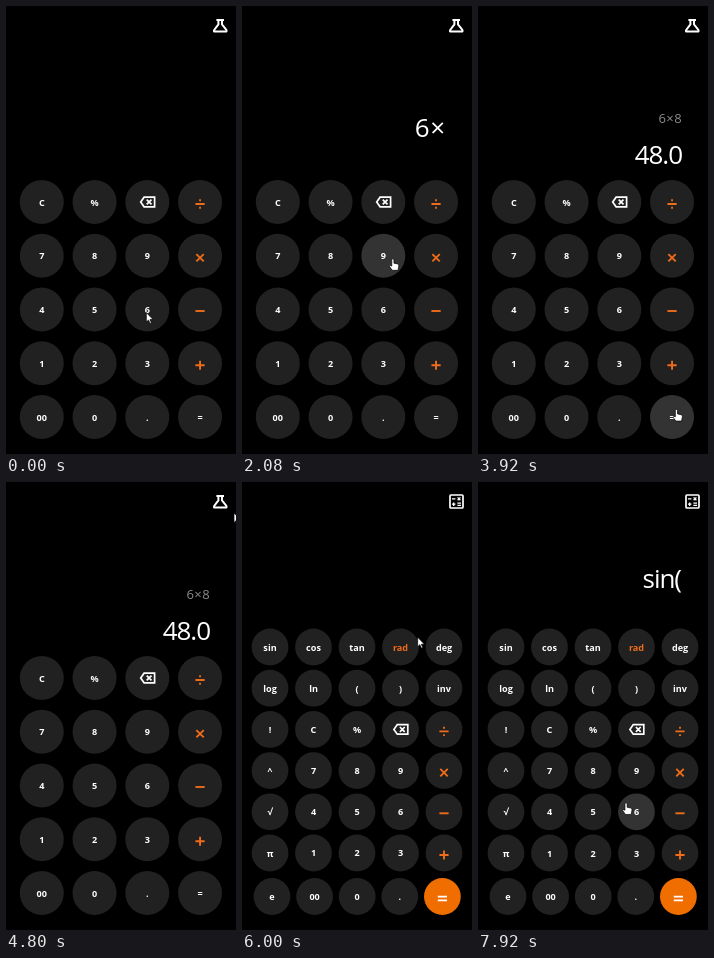
Recreate the animation shown at these times as an HTML page. Size 230 by 448 pixels, loop 8000 ms.

```html
<!DOCTYPE html>
<html lang="en">
<head>
<meta charset="utf-8">
<title>Calculator</title>
<style>
html, body { margin: 0; width: 100%; height: 100%; overflow: hidden; background: #000; }
svg { display: block; width: 100vw; height: 100vh; font-family: "Open Sans", "Noto Sans", sans-serif; }
.key text { font-size: 9.1px; font-weight: 700; fill: #fff; text-anchor: middle; }
.line { fill: none; stroke: #fff; stroke-width: 1.7; }
.accent { stroke: #ef6c1a; stroke-width: 1.9; }
#display text { text-anchor: end; fill: #fff; }
#cursor path { fill: #fff; stroke: #000; stroke-width: .7; }
</style>
</head>
<body>
<svg id="stage" viewBox="0 0 230 448">
  <rect width="230" height="448"/>
  <g id="flask">
    <circle id="glow" cx="213" cy="13" r="22" fill="#2a2a2a"/>
    <path class="line" style="stroke-width:2" d="M210.4 14H218M212.4 14V18.4L208.2 24Q207.4 25.6 209 25.6H219.6Q221 25.6 220.4 24L216 18.4V14"/>
  </g>
  <g id="pad" class="line">
    <rect x="208" y="13" width="13" height="13" rx="1"/>
    <path stroke-width="1.3" d="M210 16.8H213.4M215.6 15.4l2.8 2.8m0-2.8l-2.8 2.8M210 22.2h3.4m-1.7-1.7v3.4M215.4 21.2h3.6M215.4 23.4h3.6"/>
  </g>
  <g id="display"><text id="small"></text><text id="main"></text></g>
  <g id="keys"></g>
  <g id="cursor">
    <path id="arrow" d="M0 0V9.6L2.2 7.6L3.8 11L5.2 10.4L3.7 7.1H6.8Z"/>
    <path id="hand" d="M-1.1 1Q-1.1 0 0 0T1.1 1V4.4L4.8 5.2Q6 5.6 6 7L5.2 11.6H-.6L-3.4 7.6Q-3.2 6.2 -1.1 7.3Z"/>
  </g>
</svg>
<script>
const LOOP = 8000, TICK = 80, SWITCH = 5440;
const $ = id => document.getElementById(id);
const lerp = (a, b, p) => a + (b - a) * p;
const mix = (a, b, p) => a.map((v, i) => lerp(v, b[i], p));
const clamp = v => Math.max(0, Math.min(1, v));
const show = (el, on) => el.setAttribute('visibility', on ? 'visible' : 'hidden');

function set(el, attrs) {
  for (const k in attrs) el.setAttribute(k, attrs[k]);
}
function add(parent, tag, attrs, text = '') {
  const el = document.createElementNS('http://www.w3.org/2000/svg', tag);
  set(el, attrs);
  el.textContent = text;
  return parent.appendChild(el);
}

const glyphs = {
  '÷': 'M-4.6 2H4.6M-.9 -1.7H.9M-.9 5.7H.9',
  '×': 'M-3.7 -1.7L3.7 5.7M3.7 -1.7L-3.7 5.7',
  '−': 'M-4.6 1.5H4.6',
  '+': 'M-4.6 2H4.6M0 -2.6V6.6',
  '⌫': 'M-6.6 0L-3.2 -4.8H7.3V4.8H-3.2ZM-.6 -2.4L4.2 2.4M4.2 -2.4L-.6 2.4'
};
const rows = [
  'sin cos tan rad deg', 'log ln ( ) inv', '! C % ⌫ ÷', '^ 7 8 9 ×',
  '√ 4 5 6 −', 'π 1 2 3 +', 'e 00 0 . ='
];
const keys = {};
rows.forEach((row, r) => row.split(' ').forEach((label, c) => {
  const g = add($('keys'), 'g', { class: 'key' });
  const last = r == rows.length - 1;
  const key = keys[label] = {
    g, row: r - 2, col: c,
    wide: last ? [30 + 42.6 * c, 414.5] : [28 + 43.5 * c, 165 + 41.2 * r],
    basic: r > 1 && c > 0 ? [35.8 + (c - 1) * 52.75, 196 + (r - 2) * 53.75] : null,
    disc: add(g, 'circle', {})
  };
  if (glyphs[label]) add(g, 'path', { d: glyphs[label], class: label == '⌫' ? 'line' : 'line accent' });
  else key.text = add(g, 'text', { y: 3.5, style: label == 'rad' ? 'fill:#ef6c1a' : '' }, label);
  if (label == '=') key.big = add(g, 'path', { d: 'M-4.6 .2H4.6M-4.6 3.8H4.6', class: 'line' });
}));

function place(key, t) {
  if (t < SWITCH || !key.basic) return t < SWITCH ? key.basic : key.wide;
  const left = Math.exp((SWITCH - t) / 70);
  return [
    lerp(key.wide[0], key.basic[0], (.03 + .035 * key.row) * left),
    lerp(key.wide[1], key.basic[1], (.28 - .025 * key.col) * left)
  ];
}
const radius = t => t < SWITCH ? 22 : 18.4;

// pointer stops: arrival, departure, key or point
const stops = [
  [0, 1200, '6'], [1680, 1760, '×'], [2560, 2800, '8'], [3120, 3120, '+'], [3440, 3840, '='],
  [4480, 4640, [236, 330]], [4800, 4800, [228, 31]], [5120, 5600, [221, 20]],
  [6160, 6160, ')'], [6720, 6720, 'cos'], [7040, 7280, 'sin'], [7970, LOOP, '6']
];
function spot([time, , where]) {
  if (!keys[where]) return where;
  const [x, y] = time < SWITCH ? keys[where].basic : keys[where].wide;
  return [x - 1, y + 3];
}
function tipAt(t) {
  const i = stops.findIndex(s => t <= s[1]), next = stops[i], prev = stops[i - 1] || next;
  const p = clamp((t - prev[1]) / (next[0] - prev[1] || 1));
  return mix(spot(prev), spot(next), prev == next ? 1 : p);
}

function inside(key, t) {
  const at = place(key, t);
  if (t < 960 || !at) return false;
  const [x, y] = tipAt(t);
  return Math.hypot(x - at[0], y - at[1]) < radius(t) - 1;
}
const hover = (key, t) => inside(key, t) ? 1 : inside(key, t - TICK) ? .7 : 0;

function write(id, text, y, size = 26, opacity = 1, x = 204) {
  const gap = text.includes('×') ? .03 : -.04;
  set($(id), { x, y, opacity, 'font-size': size, 'letter-spacing': gap * size });
  $(id).textContent = text;
}

const typed = [[0, ''], [1120, '6'], [1760, '6×'], [2720, '6×8']];
function drawDisplay(t) {
  write('small', '', 0);
  if (t < 3680) {
    write('main', typed.findLast(s => s[0] <= t)[1], 131);
  } else if (t < SWITCH) {
    const p = clamp((t - 3600) / 240);
    write('small', '6×8', lerp(131, 116.5, p), lerp(26, 13, p), lerp(1, .55, p));
    write('main', '48.0', 158, 26, p);
  } else if (t < 7200) {
    const p = clamp((t - SWITCH) / 240);
    write('small', '6×8', 111.5 - 10 * p, 13, .2 * (1 - p), 207 + 6 * p);
    write('main', '48.0', 154.5 - 10 * p, 26, .32 * (1 - p), 207 + 6 * p);
  } else write('main', 'sin(', 106, 26, 1, 203);
}

function drawKey(key, t) {
  const at = place(key, t), wide = t >= SWITCH;
  show(key.g, at);
  if (!at) return;
  const v = Math.round(lerp(33, 51, hover(key, t)));
  set(key.g, { transform: `translate(${at})` });
  set(key.disc, { r: radius(t), fill: wide && key.big ? '#f06d00' : `rgb(${v},${v},${v})` });
  if (key.big) {
    set(key.big, { display: wide ? 'inline' : 'none' });
    set(key.text, { display: wide ? 'none' : 'inline' });
  }
}

function drawIcon(t, onIcon) {
  const wide = t >= SWITCH, p = clamp((t - SWITCH) / 240);
  show($('pad'), wide);
  show($('glow'), t >= 5280 && onIcon);
  set($('flask'), {
    opacity: wide ? .3 * (1 - p) : 1,
    transform: wide ? `translate(${5 + 6 * p} ${-10 - 6 * p})` : ''
  });
}

function draw(t) {
  const all = Object.values(keys), [x, y] = tipAt(t);
  const onIcon = Math.hypot(x - 214, y - 20) < 14;
  const hand = onIcon || all.some(key => inside(key, t));
  all.forEach(key => drawKey(key, t));
  drawDisplay(t);
  drawIcon(t, onIcon);
  set($('cursor'), { transform: `translate(${x} ${y})` });
  show($('hand'), hand);
  show($('arrow'), !hand);
}

const start = performance.now();
function loop() {
  const t = (performance.now() - start) % LOOP;
  draw(Math.floor(t / TICK) * TICK);
  requestAnimationFrame(loop);
}
loop();
</script>
</body>
</html>
```
